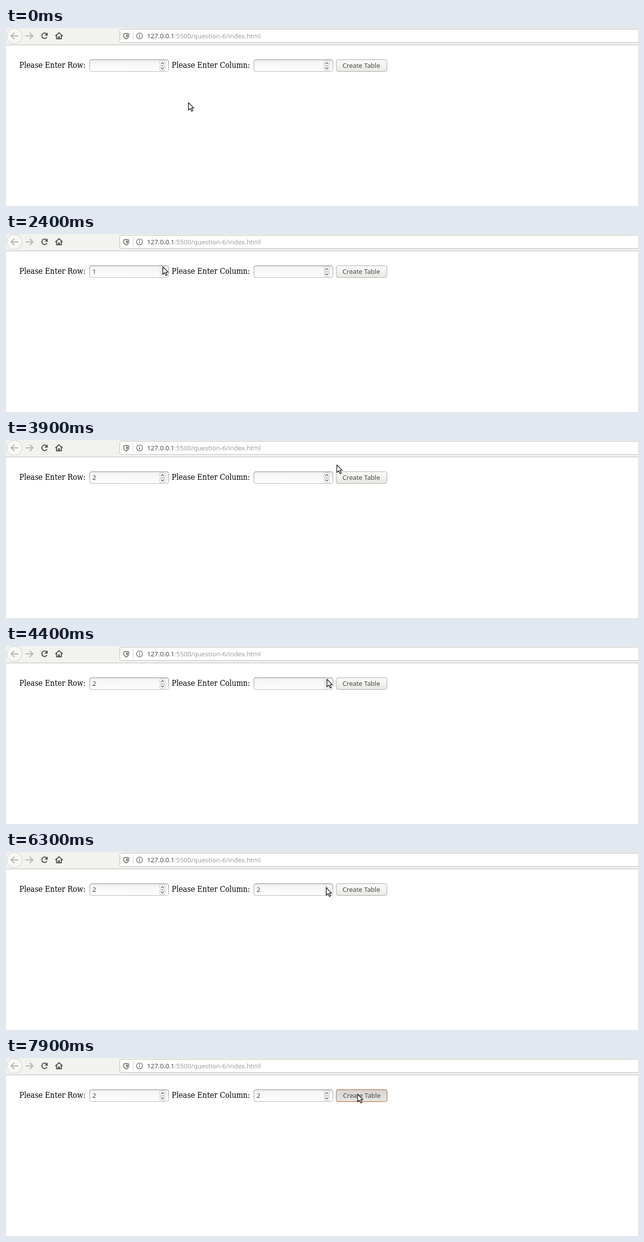
These frames come from a looping animation (1280 px wide and 362 px high, 8 s). An HTML page:

```html
<!DOCTYPE html>
<html lang="en">
<head>
<meta charset="utf-8">
<title>Create Table</title>
<style>
  html, body { margin: 0; width: 100%; height: 100%; overflow: hidden; background: #fff; }
  svg { display: block; }
  .ui { font: 13.2px "Open Sans", "Noto Sans", sans-serif; fill: #3c3c3c; }
  .label { font: condensed 16px "DejaVu Serif Condensed", "DejaVu Serif", serif; fill: #000; }
  .line { fill: none; stroke: #4b4b49; stroke-width: 2; }
  .thin { fill: none; stroke: #5c5c5a; stroke-width: 1.2; }
</style>
</head>
<body>
<svg width="1280" height="362" viewBox="0 0 1280 362">
  <defs>
    <linearGradient id="fieldFill" x2="0" y2="1">
      <stop stop-color="#ededed"/><stop offset=".25" stop-color="#f6f6f6"/><stop offset="1" stop-color="#fdfdfd"/>
    </linearGradient>
    <linearGradient id="buttonFill" x2="0" y2="1">
      <stop stop-color="#fbfbfa"/><stop offset="1" stop-color="#e7e7e3"/>
    </linearGradient>
    <linearGradient id="hoverFill" x2="0" y2="1">
      <stop stop-color="#fefefe"/><stop offset="1" stop-color="#f2f2ef"/>
    </linearGradient>
    <linearGradient id="pressedFill" x2="0" y2="1">
      <stop stop-color="#d6d5d2"/><stop offset="1" stop-color="#e6e5e2"/>
    </linearGradient>
    <linearGradient id="edge" x2="0" y2="1">
      <stop stop-color="#888"/><stop offset="1" stop-color="#b4b4b4"/>
    </linearGradient>
    <g id="field">
      <rect x=".5" y=".5" width="160" height="24" rx="4" fill="url(#fieldFill)" stroke="url(#edge)"/>
    </g>
    <g id="spinner" fill="#fafafa" stroke="#bcbcbc">
      <rect x="142.5" y="2.5" width="11" height="10" rx="3"/>
      <rect x="142.5" y="13.5" width="11" height="9" rx="3"/>
      <path class="thin" d="M145.2 9l2.8-2.8 2.8 2.8M145.2 16.5l2.8 2.8 2.8-2.8" style="stroke:#444"/>
    </g>
  </defs>

  <rect width="1280" height="34" fill="#f2f2ee"/>
  <path d="M0 34.5H1280" stroke="#b9b8b5"/>
  <circle cx="17" cy="16" r="15.5" fill="#f7f7f4" stroke="#cfceca"/>
  <path class="line" d="M25 16H11M17 9.5L10.5 16l6.5 6.5" style="stroke:#b0b0ad"/>
  <path class="line" d="M40 16H54M48 9.5l6.5 6.5-6.5 6.5" style="stroke:#b0b0ad"/>
  <path class="line" d="M82.8 12.7A5.6 5.6 0 1 0 83 18.5"/>
  <path d="M84.5 9v6.5H78z" fill="#4b4b49"/>
  <path class="line" d="M100 16.2l7.3-6.7 7.3 6.7M102.5 15v7h9.5v-7"/>
  <path d="M105.5 17h3.5v5h-3.5z" fill="#4b4b49"/>
  <rect x="230.5" y="2.5" width="1060" height="27" rx="3" fill="#fff" stroke="#bbb9b5"/>
  <path d="M243.5 10.8l5 1.2v4q0 4-5 6.3q-5-2.3-5-6.3v-4z" class="thin" style="stroke-width:1.5"/>
  <path d="M243.7 13l2.8.7v2.3q0 2.3-2.8 3.8z" fill="#5c5c5a"/>
  <path d="M257.5 5v21" stroke="#d0d0ce"/>
  <circle class="thin" cx="270.5" cy="16" r="6"/>
  <path d="M270.5 12.2v1.6M270.5 15v4.3" stroke="#5c5c5a" stroke-width="1.5"/>
  <text class="ui" x="285.5" y="21">127.0.0.1<tspan fill="#969696">:5500/question-6/index.html</tspan></text>

  <text class="label" x="27" y="81">Please Enter Row:</text>
  <text class="label" x="335.5" y="81">Please Enter Column:</text>
  <g transform="translate(169 64)"><use href="#field"/><use href="#spinner" id="rowSpinner"/></g>
  <g transform="translate(501.5 64)"><use href="#field"/><use href="#spinner" id="colSpinner"/></g>
  <text class="ui" id="row" x="175" y="81"></text>
  <text class="ui" id="col" x="507.5" y="81"></text>

  <rect id="halo" x="667.7" y="63" width="105.5" height="27" rx="5" fill="#f6ddcf"/>
  <rect id="button" x="669" y="64.5" width="102.5" height="24" rx="4"/>
  <text class="ui" id="caption" y="81">Create Table</text>

  <path id="arrow" d="M.6 .8V16l3.6-3.4 2.7 5.8 2.6-1.2-2.7-5.6h4.7z" fill="#fff" stroke="#111" stroke-width="1.3" stroke-linejoin="round"/>
  <g id="beam" fill="none">
    <path d="M-3.5-7h2.5l1 1 1-1h2.5M0-6V6M-3.5 7h2.5l1-1 1 1h2.5" stroke="#fff" stroke-width="3.4"/>
    <path d="M-3.5-7h2.5l1 1 1-1h2.5M0-6V6M-3.5 7h2.5l1-1 1 1h2.5" stroke="#111" stroke-width="1.7"/>
  </g>
</svg>
<script>
  const LOOP = 8000;
  // Pointer stops: time, x, y, shape
  const stops = [
    [0, 369, 151, "arrow"], [600, 364, 144, "arrow"], [700, 345, 117, "arrow"],
    [800, 319, 92, "arrow"], [900, 303, 67, "beam"], [1100, 317, 64, "arrow"],
    [2200, 317, 66, "arrow"], [3200, 469.5, 87, "beam"], [3500, 555, 83, "beam"],
    [3600, 600, 77, "beam"], [3700, 634, 71, "beam"], [3800, 659, 56, "arrow"],
    [3900, 669.5, 50, "arrow"], [4200, 670, 54, "arrow"], [4300, 659, 63, "arrow"],
    [4400, 649.5, 67, "arrow"], [4600, 648, 69, "arrow"], [6200, 648, 71, "arrow"],
    [6300, 648, 72, "arrow"], [7300, 686, 73, "arrow"], [7400, 711.5, 73, "arrow"]
  ];
  const el = id => document.getElementById(id);
  const set = (id, attrs) => Object.entries(attrs).forEach(([k, v]) => el(id).setAttribute(k, v));
  const show = (id, on) => set(id, { visibility: on ? "visible" : "hidden" });
  const count = (t, one, two) => t < one ? "" : t < two ? "1" : "2";

  function draw(t) {
    const [, x, y, shape] = stops.findLast(stop => stop[0] <= t);
    for (const id of ["arrow", "beam"]) {
      set(id, { transform: `translate(${x} ${y})` });
      show(id, id === shape);
    }
    el("row").textContent = count(t, 2400, 2800);
    el("col").textContent = count(t, 4800, 5300);
    set("rowSpinner", { opacity: t >= 1100 && t < 3200 ? 0.45 : 1 });
    set("colSpinner", { opacity: t >= 4400 && t < 7300 ? 0.45 : 1 });

    const pressed = t >= 7900, hover = t >= 7300;
    const fill = pressed ? "pressedFill" : hover ? "hoverFill" : "buttonFill";
    set("button", { fill: `url(#${fill})`, stroke: pressed ? "#b5714c" : "#aaa9a5" });
    set("caption", { x: pressed ? 682.5 : 681.5 });
    show("halo", pressed);
  }

  function tick() {
    draw(performance.now() % LOOP);
    requestAnimationFrame(tick);
  }
  tick();
</script>
</body>
</html>
```
